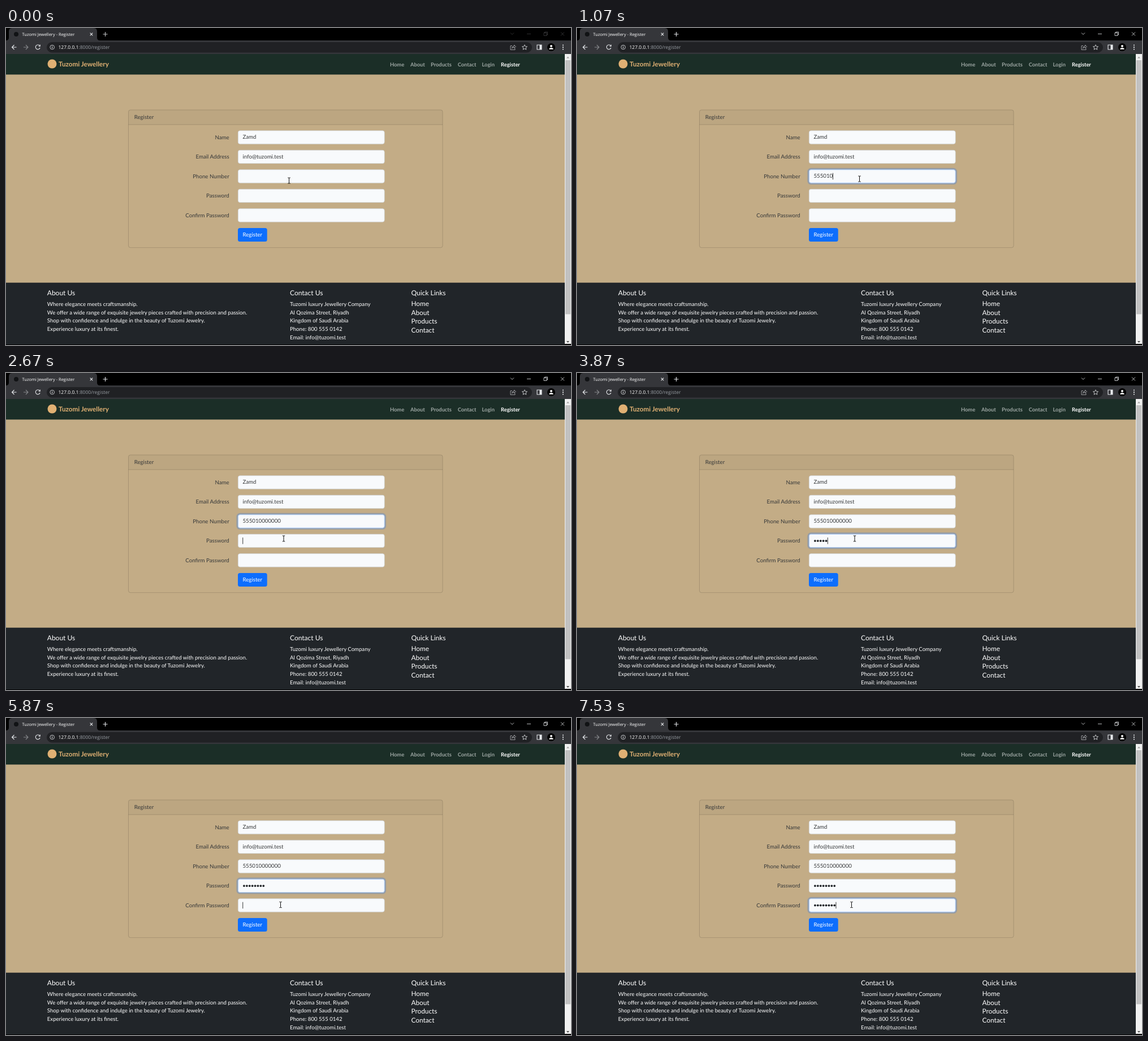
An HTML page for the animation above (8 s loop, 999 by 561 pixels).

```html
<!DOCTYPE html>
<html lang="en">
<head>
<meta charset="utf-8">
<title>Register</title>
<style>
  html, body { margin: 0; width: 100%; height: 100%; overflow: hidden; background: #000; }
  svg { display: block; }
  text { font: 9.7px Lato, sans-serif; fill: #363839; text-rendering: geometricPrecision; white-space: pre; }
  .chrome text { font: 7.5px "Open Sans", sans-serif; fill: #fff; }
  .chrome .url { font-size: 8.5px; }
  .chrome .dim { fill: #9aa0a6; }
  .icon { fill: none; stroke: #e8eaed; stroke-width: 1.1; }
  .thin { stroke-width: .8; }
  .nav text { font-size: 9.3px; font-weight: 700; fill: #9ea7a4; }
  .nav .brand { font-size: 11.7px; fill: #e0b073; }
  .nav .current { fill: #fff; }
  .label { text-anchor: end; }
  .footer text { font-size: 9.62px; fill: #fff; }
  .footer .head { font-size: 12px; }
  .footer .link { font-size: 11.8px; }
  #tip text { font: 6.9px "Open Sans", sans-serif; fill: #444; }
</style>
</head>
<body>
<svg width="999" height="561" viewBox="0 0 999 561">
  <g class="chrome">
    <path d="M0 22q5 0 5-5V6q0-6 6-6H155q6 0 6 6V17q0 5 5 5H999V46H0Z" fill="#35363a"/>
    <circle cx="18" cy="11" r="4" fill="#111315"/>
    <text x="28.5" y="13.7">Tuzomi Jewellery - Register</text>
    <path class="icon" d="M148.700 8.700l4.600 4.600m0-4.600l-4.600 4.600"/>
    <path class="icon" id="plus" d="M171.500 11h8m-4-4v8"/>
    <path class="icon thin" id="controls" d="M892 8.500l3 3 3-3M921 10.500h7M951 8.500h5v5h-5zM952.500 8.500v-1.500h5v5h-1.500M981 7.500l6 6m0-6l-6 6"/>
    <rect x="72" y="25" width="858" height="18.500" rx="9.250" fill="#202124"/>
    <path class="icon" d="M18.500 34h-8m4-4l-4 4 4 4M59.500 31.300a4 4 0 1 0 .6 3.700M60.300 29.500v2.700h-2.700"/>
    <path class="icon" stroke-opacity=".45" d="M31 34h8m-4-4l4 4-4 4"/>
    <circle class="icon thin" cx="81.700" cy="34" r="3.800"/>
    <path class="icon" d="M81.700 33.500v2.500M81.700 31.700v1"/>
    <text class="url" x="92.5" y="37.2">127.0.0.1<tspan class="dim">:8000/register</tspan></text>
    <path class="icon thin" stroke-opacity=".75" d="M895 31.500h-3v7h8v-2.500M894.500 36q.5-4 4-4v-2l3 3-3 3v-2q-2.500 0-4 2"/>
    <path class="icon thin" d="M917 29.700l1.300 2.900 3.200.3-2.400 2.100.7 3.200-2.800-1.700-2.800 1.700.7-3.200-2.400-2.100 3.200-.3z"/>
    <path class="icon" d="M939 30h8v8h-8z"/>
    <path d="M943.500 30h3.500v8h-3.500z" fill="#e8eaed"/>
    <circle cx="964" cy="34" r="7" fill="#000"/>
    <path d="M960.200 37.700q0-2.700 3.800-2.700t3.800 2.700z" fill="#fff"/>
    <circle cx="964" cy="32" r="2" fill="#fff"/>
    <path d="M984 29.500h1.800v1.800h-1.800zm0 3.600h1.800v1.800h-1.800zm0 3.600h1.800v1.800h-1.800z" fill="#e8eaed"/>
  </g>

  <rect y="82" width="988" height="369" fill="#c3ac86"/>
  <rect y="46" width="988" height="36.400" fill="#1b2e27"/>
  <rect y="450.700" width="988" height="109.300" fill="#212529"/>
  <g class="nav" id="nav">
    <circle cx="81.500" cy="63.500" r="8" fill="#e0b073"/>
    <text class="brand" x="93" y="68">Tuzomi Jewellery</text>
  </g>
  <rect x="988" y="46" width="11" height="513" fill="#f1f1f1"/>
  <rect x="989" y="57" width="9" height="449.500" fill="#c1c1c1"/>
  <path d="M991 53.500l2.500-3 2.500 3z" fill="#a3a3a3"/>
  <path d="M991 554l2.500 3 2.500-3z" fill="#505050"/>

  <path d="M216.500 171v-22.500q0-3.500 3.500-3.500h548.500q3.500 0 3.500 3.500V171z" fill="#000" fill-opacity=".035"/>
  <g fill="none" stroke="#000" stroke-opacity=".15">
    <rect x="216.500" y="145" width="555.500" height="243.700" rx="3.500"/>
    <path d="M216.500 171h555.500"/>
  </g>
  <text x="226.700" y="161">Register</text>
  <g id="form"></g>
  <rect x="410" y="353.900" width="51.700" height="24.100" rx="3.500" fill="#0d6efd"/>
  <text x="418.500" y="369.300" style="fill:#fff">Register</text>
  <g class="footer" id="footer"></g>

  <rect id="caret" width=".9" height="11.500" fill="#222"/>
  <g id="tip">
    <rect x="489.500" y="338.500" width="89" height="16" fill="#fff" stroke="#999" stroke-width=".7"/>
    <text x="493" y="349">Please fill out this field.</text>
  </g>
  <path id="pointer" d="M-2.200-5h1.400q.8 0 .8.800v8.400q0 .8-.8.800h-1.400M2.200-5H.8Q0-5 0-4.200M0 4.200q0 .8.800.8h1.400" fill="none" stroke="#000" stroke-width=".95"/>
</svg>
<script>
const LOOP = 8000, BLINK = 1000, CARET_ON = 540, FADE = 130;
const TEXT_X = 418.5, DIGIT = 5.63, DOT = 4.9, PHONE = '555010000000';
const $ = id => document.getElementById(id);
const add = (parent, markup) => parent.insertAdjacentHTML('beforeend', markup);
const write = (parent, x, y, text, cls = '') =>
  add(parent, `<text class="${cls}" x="${x}" y="${y}">${text}</text>`);
const rowY = row => 181.4 + row * 34.5;

[['Home', 679], ['About', 715], ['Products', 751], ['Contact', 798.7], ['Login', 841.5], ['Register', 875]]
  .forEach(([text, x]) => write($('nav'), x, 67.5, text, text === 'Register' ? 'current' : ''));

const column = (x, head, lines, top, step, cls) => {
  write($('footer'), x, 472.8, head, 'head');
  lines.forEach((line, i) => write($('footer'), x, top + i * step, line, cls));
};
column(72.8, 'About Us', [
  'Where elegance meets craftsmanship.',
  'We offer a wide range of exquisite jewelry pieces crafted with precision and passion.',
  'Shop with confidence and indulge in the beauty of Tuzomi Jewelry.',
  'Experience luxury at its finest.'], 491.6, 14.9);
column(502, 'Contact Us', [
  'Tuzomi luxury Jewellery Company', 'Al Qozima Street, Riyadh', 'Kingdom of Saudi Arabia',
  'Phone: 800 555 0142', 'Email: info@tuzomi.test'], 491.6, 14.9);
column(716.5, 'Quick Links', ['Home', 'About', 'Products', 'Contact'], 492.3, 15.4, 'link');

// A rect around an input box, grown by `by` on every side
const box = (row, by, attrs) => `<rect x="${410 - by}" y="${rowY(row) - by}" width="${259.5 + 2 * by}"
  height="${24.1 + 2 * by}" rx="${3.7 + by}" ${attrs}/>`;

['Name', 'Email Address', 'Phone Number', 'Password', 'Confirm Password'].forEach((label, row) => {
  write($('form'), 394.7, rowY(row) + 15.3, label, 'label');
  add($('form'), box(row, 2.6, `id="ring${row}" opacity="0" fill="#0d6efd" fill-opacity=".25"`)
    + box(row, -.35, 'fill="#f8fafc" stroke="#ced4da" stroke-width=".7"')
    + box(row, -.35, `id="edge${row}" opacity="0" fill="#f8fafc" stroke="#86b7fe" stroke-width=".7"`)
    + `<g id="value${row}"></g>`);
});
['Zamd', 'info@tuzomi.test', ''].forEach((text, row) => write($('value' + row), TEXT_X, rowY(row) + 14.9, text));
for (const row of [3, 4]) for (let i = 0; i < 8; i++)
  add($('value' + row), `<circle cx="${TEXT_X + (i + .5) * DOT}" cy="${rowY(row) + 12.2}" r="1.95" fill="#212529"/>`);

// keys: [time, characters typed so far]
const each = times => times.map((t, i) => [t, i + 1]);
const fields = [
  { row: 2, click: 290, pitch: DIGIT, keys: [[800, 5], [1070, 6], [1600, 8], [1670, 10], [1730, 12]] },
  { row: 3, click: 2670, pitch: DOT, keys: each([3070, 3270, 3400, 3600, 3870, 4000, 4270, 4400]) },
  { row: 4, click: 5870, pitch: DOT, keys: each([6330, 6470, 6600, 6730, 7000, 7130, 7400, 7530]) }
];
// [start, end, from, to]
const moves = [
  [70, 330, [500.5, 270], [499.5, 267]],
  [2130, 2530, [499.5, 267], [491, 293]],
  [4800, 5070, [491, 293], [485.5, 330.5]]
];
const clamp = v => Math.max(0, Math.min(1, v));
const show = (node, on) => node.setAttribute('visibility', on ? 'visible' : 'hidden');

function draw(t) {
  const focused = fields.filter(f => f.click <= t).pop();
  show($('caret'), false);
  fields.forEach((f, i) => {
    const next = fields[i + 1];
    const glow = clamp((t - f.click) / FADE) - (next ? clamp((t - next.click) / FADE) : 0);
    $('ring' + f.row).setAttribute('opacity', glow);
    $('edge' + f.row).setAttribute('opacity', glow);
    const [last, count] = f.keys.filter(k => k[0] <= t).pop() || [f.click, 0];
    if (f.row === 2) $('value2').firstChild.textContent = PHONE.slice(0, count);
    else [...$('value' + f.row).children].forEach((dot, n) => show(dot, n < count));
    if (f === focused) {
      $('caret').setAttribute('x', TEXT_X + count * f.pitch - .2);
      $('caret').setAttribute('y', rowY(f.row) + 6.3);
      show($('caret'), (t - last) % BLINK < CARET_ON);
    }
  });
  $('controls').setAttribute('opacity', focused ? 1 : .25);
  $('plus').setAttribute('opacity', focused ? 1 : .85);
  show($('tip'), t >= 5670 && t < 5870);

  const [start, end, from, to] = moves.filter(m => m[0] <= t).pop() || moves[0];
  const p = clamp((t - start) / (end - start)), ease = p * p * (3 - 2 * p);
  const [x, y] = from.map((v, i) => v + (to[i] - v) * ease);
  $('pointer').setAttribute('transform', `translate(${x} ${y})`);
}

const begin = performance.now();
function tick() {
  draw((performance.now() - begin) % LOOP);
  requestAnimationFrame(tick);
}
tick();
</script>
</body>
</html>
```
